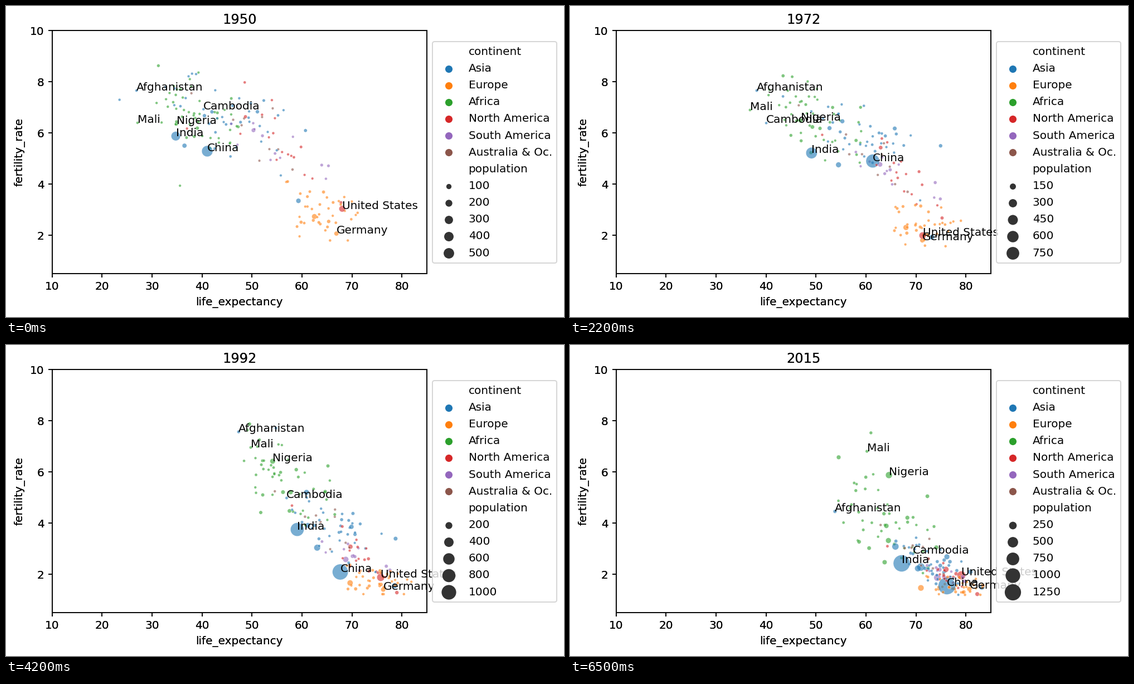
Write a matplotlib script that moves like this. It is 1001 px wide and 559 px high and loops after 6.6 s.

```python
import numpy as np
import matplotlib.pyplot as plt
from matplotlib.animation import FuncAnimation
from matplotlib.ticker import MaxNLocator

W, H, DPI = 1001, 559, 144
plt.rcParams["font.family"] = "DejaVu Sans"
rng = np.random.default_rng(5)

YEARS = np.arange(1950, 2016)
T = (YEARS - 1950) / 65
KEYS = [1950, 1964, 1984, 2002, 2015]
COLORS = {
    "Asia": "#1f77b4", "Europe": "#ff7f0e", "Africa": "#2ca02c",
    "North America": "#d62728", "South America": "#9467bd",
    "Australia & Oc.": "#8c564b",
}
countries = []


def bump(year, width):
    return np.exp(-((YEARS - year) / width) ** 2)


def rise(start, end, power=0.6):
    return start + (end - start) * T ** power


def fall(high, low, mid, width=9):
    return low + (high - low) / (1 + np.exp((YEARS - mid) / width))


def add(area, pop, life, fert, label=None):
    """pop holds the first and last population; growth is geometric."""
    people = pop[0] * (pop[1] / pop[0]) ** T
    countries.append(dict(color=COLORS[area], life=life, fert=fert,
                          pop=people, label=label))


def named(label, area, pop, life, fert):
    add(area, pop, np.interp(YEARS, KEYS, life), np.interp(YEARS, KEYS, fert), label)
    return countries[-1]


def shock(country, year, width, life, fert=0):
    country["life"] = country["life"] + life * bump(year, width)
    country["fert"] = country["fert"] + fert * bump(year, width)


def cloud(area, n, life, fert, life_sd, fert_sd, r, size=1.3, growth=3):
    """n random countries scattered around a continent's average path."""
    sx = life_sd[0] + (life_sd[1] - life_sd[0]) * T
    sy = fert_sd[0] + (fert_sd[1] - fert_sd[0]) * T
    for i in range(n):
        z, w = np.clip(rng.normal(size=2), -1.8, 1.8)
        p, q = rng.uniform(0, 2 * np.pi, 2)
        z = z + 0.2 * np.sin(6 * T + p)
        w = w + 0.3 * np.sin(8 * T + q)
        x = life + sx * z
        y = fert + sy * (w * np.sqrt(1 - r * r) - r * z)
        if area == "Africa" and i % 4 == 0:  # epidemic years
            x = x - 7 * bump(2003, 8)
            y = y - 0.6 * bump(2003, 8)
        pop = min(np.exp(rng.normal(size, 1.1)), 40)
        add(area, (pop, pop * growth), np.minimum(x, 83.5),
            np.maximum(y, 1.2 + 0.6 * (1 - T) ** 3))


# Labelled countries
named("Afghanistan", "Asia", (8, 34), [26.9, 34, 44.4, 51, 53.8],
      [7.66, 7.66, 7.66, 7.46, 4.46])
cambodia = named("Cambodia", "Asia", (4.4, 15.5), [40.3, 43.2, 53.2, 61.6, 69.4],
                 [6.93, 6.9, 6.19, 3.48, 2.8])
shock(cambodia, 1977, 4.1, -31.6, -1)
named("Mali", "Africa", (4.7, 17.5), [27.1, 30.8, 45.8, 54.7, 60.2],
      [6.4, 6.78, 7.08, 6.81, 6.81])
named("Nigeria", "Africa", (38, 181), [34.9, 42.7, 53.3, 55.2, 64.6],
      [6.36, 6.33, 6.72, 6.05, 5.88])
named("India", "Asia", (376, 1310), [34.76, 44.2, 56.5, 62.25, 67.15],
      [5.88, 5.8, 4.35, 3.01, 2.43])
china = named("China", "Asia", (554, 1397), [41.06, 52, 65.65, 70.2, 76.2],
              [5.29, 6.11, 2.6, 1.46, 1.55])
china["pop"] = 554 + 843 * (T + 0.04 * (np.sin(np.pi * T) - np.sin(2 * np.pi * T)))
shock(china, 1960.5, 1.8, -18, -2.6)
shock(china, 1972, 5, 3.9, 0.2)
usa = named("United States", "North America", (158, 320),
            [68.05, 70.3, 74.7, 77.1, 79.1], [3.01, 3.21, 1.78, 2.01, 1.96])
shock(usa, 1957, 4, 0, 0.6)
shock(usa, 1974, 6, -0.8, -0.72)
germany = named("Germany", "Europe", (70, 81), [66.9, 70.6, 74.4, 78.6, 80.7],
                [2.07, 2.48, 1.45, 1.35, 1.43])
shock(germany, 1973, 4, -0.9, -0.28)

# Other populous countries
add("Asia", (70, 258), rise(36.5, 71), fall(5.6, 2.2, 1982))
add("Asia", (82, 128), rise(59.3, 83.2, 0.5), fall(4.2, 1.5, 1957))
add("Asia", (37, 189), rise(40.5, 65.9, 0.5), fall(6.7, 2.6, 1997))
add("Asia", (38, 161), rise(42, 70.4, 0.9), fall(6.9, 2, 1988))
add("South America", (54, 206), rise(50.3, 74.3), fall(6.3, 1.8, 1978))
add("North America", (28, 126), rise(48.7, 76), fall(6.8, 2.1, 1980))
add("Europe", (103, 144), rise(62.5, 71, 0.4), fall(2.8, 1.45, 1977))

# Countries with unusual paths
add("Asia", (4, 27), rise(23.5, 66, 0.7),
    fall(7.3, 3, 2002, 5) + 2 * bump(1985, 8))
add("Africa", (2.5, 20), rise(35, 61, 1.4), fall(7.7, 7.5, 2000))
add("Africa", (0.5, 2), rise(35.6, 66.7), fall(3.9, 3.7, 1980) + 1.7 * bump(1984, 18))
add("Africa", (2, 11.5), rise(39.3, 66, 1), fall(8.4, 3.6, 1994))
shock(countries[-1], 1994, 1.2, -43.8)
add("North America", (3, 10.7), rise(37, 64.3), fall(6.2, 2.8, 1994))
shock(countries[-1], 2010, 0.6, -30.7)

# The remaining countries
cloud("Africa", 45, rise(38.5, 63.5, 0.75), fall(6.8, 3.8, 1998),
      (4.4, 5.4), (0.7, 1.0), 0.5, growth=3.5)
cloud("Asia", 36, rise(47, 74.5), fall(6.6, 2, 1986, 10),
      (8.5, 4), (1.1, 0.65), 0.6)
cloud("Europe", 38, rise(64, 78.3), fall(2.9, 1.45, 1975, 10),
      (4, 3.4), (0.55, 0.2), 0.2, size=2, growth=1.15)
cloud("North America", 16, rise(54, 75.3, 0.55), fall(6, 1.9, 1977, 10),
      (7, 3.5), (1.3, 0.4), 0.8, size=0.6)
cloud("South America", 12, rise(54, 75.5, 0.65), fall(6, 2, 1980, 10),
      (6.5, 2.5), (1.2, 0.35), 0.8)
cloud("Australia & Oc.", 10, rise(51, 71, 0.7), fall(6.2, 2.6, 1982, 12),
      (8, 5), (1.2, 0.8), 0.8, size=0.2)

rng.shuffle(countries)
life, fert, pop = (np.array([c[k] for c in countries]) for k in ("life", "fert", "pop"))


def area_of(p):
    return 5 + 0.167 * p


fig = plt.figure(figsize=(W / DPI, H / DPI), dpi=DPI, facecolor="white")
box = [82.6 / W, 1 - 481.2 / H, 672.4 / W, 436.8 / H]


def make_axes(face):
    a = fig.add_axes(box, facecolor=face, label=face)
    a.set(xlim=(10, 85), ylim=(0.5, 10), xticks=range(10, 81, 10),
          yticks=range(2, 11, 2))
    a.set_xlabel("life_expectancy", labelpad=4.5)
    a.set_ylabel("fertility_rate")
    return a


# The axes are drawn twice, which makes their text heavier
layers = [make_axes("white"), make_axes("none")]
ax = layers[1]
dots = ax.scatter(life[:, 0], fert[:, 0], s=area_of(pop[:, 0]),
                  c=[c["color"] for c in countries], alpha=0.6,
                  edgecolors="white", linewidths=0.25)
labels = [(i, ax.text(0, 0, c["label"])) for i, c in enumerate(countries) if c["label"]]


def key(color, s):
    return ax.scatter([], [], s=s, color=color, linewidths=0)


blank = key("white", 0)
hue_keys = [blank] + [key(c, 43) for c in COLORS.values()] + [blank]
hue_names = ["continent", *COLORS, "population"]
size_keys = {v: key("#333333", area_of(v))
             for step in (100, 150, 200, 250) for v in range(step, step * 6, step)}


def draw_legend(top):
    ticks = [int(v) for v in MaxNLocator(6).tick_values(0, top) if 0 < v <= top]
    ax.legend(hue_keys + [size_keys[v] for v in ticks],
              hue_names + [str(v) for v in ticks], loc="center left",
              bbox_to_anchor=(1, 0.499), labelspacing=0.557, borderpad=0.43)


def update(n):
    for a in layers:
        a.set_title(str(YEARS[n]), fontsize=12)
    dots.set_offsets(np.column_stack([life[:, n], fert[:, n]]))
    dots.set_sizes(area_of(pop[:, n]))
    for i, text in labels:
        text.set_position((life[i, n], fert[i, n]))
    draw_legend(pop[:, n].max())
    return []


anim = FuncAnimation(fig, update, frames=len(YEARS), interval=100,
                     init_func=lambda: update(0), repeat=True, repeat_delay=0)
plt.show()
```
